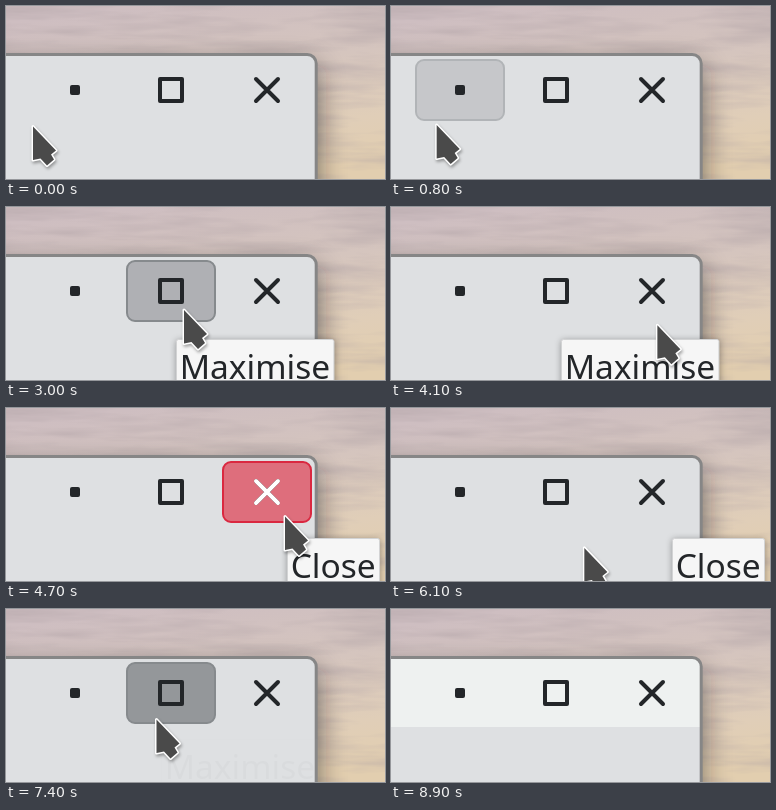
Recreate the animation shown at these times as an HTML page. Size 379 by 173 pixels, loop 9000 ms.

```html
<!DOCTYPE html>
<html lang="en">
<head>
<meta charset="utf-8">
<title>Window buttons</title>
<style>
  html, body { margin: 0; width: 100%; height: 100%; overflow: hidden; }
  svg { display: block; width: 379px; height: 173px; }
  text { font: 33.5px "Noto Sans", sans-serif; fill: #232629; }
  .icon { fill: none; stroke: #232629; stroke-width: 4; stroke-linejoin: round; stroke-linecap: round; }
  .light { stroke: #fff; }
  .hover { stroke: #868a8d; stroke-width: 2; }
  .hover.danger { stroke: #da2840; }
  .tip rect { fill: #f6f6f6; stroke: #d2d3d4; filter: drop-shadow(0 1px 3px #0005); }
  #pointer { filter: drop-shadow(1px 2px 1.5px #0005); }
</style>
</head>
<body>
<svg viewBox="0 0 379 173">
  <defs>
    <linearGradient id="sky" x1=".35" x2=".65" y2="1">
      <stop offset="0" stop-color="#cebec1"/>
      <stop offset=".4" stop-color="#d5c5be"/>
      <stop offset=".75" stop-color="#e0ceb8"/>
      <stop offset="1" stop-color="#e2ceaf"/>
    </linearGradient>
    <filter id="streaks" x="0" y="0" width="1" height="1">
      <feTurbulence type="fractalNoise" baseFrequency=".009 .07" numOctaves="4" seed="4"/>
      <feColorMatrix values="0 0 0 0 .42  0 0 0 0 .35  0 0 0 0 .37  1 0 0 0 -.38"/>
    </filter>
    <filter id="blur" filterUnits="userSpaceOnUse" x="-120" y="-40" width="600" height="360">
      <feGaussianBlur stdDeviation="14"/>
    </filter>
    <clipPath id="inside"><rect x="-20" y="48.5" width="330.2" height="200" rx="9"/></clipPath>
  </defs>

  <rect width="379" height="173" fill="url(#sky)"/>
  <rect width="379" height="173" filter="url(#streaks)"/>
  <rect id="shadow" x="-60" y="60" width="371" height="220" rx="9" fill="#1d1512" filter="url(#blur)"/>
  <rect x="-20" y="48.5" width="330.2" height="200" rx="9" fill="#dee0e2"/>
  <rect id="inactive" y="48" width="312" height="70" fill="#eef1f0" clip-path="url(#inside)"/>
  <rect x="-20" y="48.5" width="330.2" height="200" rx="9" fill="none" stroke="#868686" stroke-width="3"/>

  <g id="hovers"></g>
  <rect x="64" y="79" width="10" height="10" rx="2" fill="#232629"/>
  <rect class="icon" x="154" y="73" width="22" height="22"/>
  <path class="icon" d="M250 73l22 22m0-22l-22 22"/>
  <path id="lightCross" class="icon light" d="M250 73l22 22m0-22l-22 22"/>
  <g id="tips"></g>
  <path id="pointer" d="M0 0V33.5L7.5 32L14 39L21 33L18 28L23 24Z"
        fill="#4a4a4a" stroke="#fff" stroke-width="3" stroke-linejoin="round" paint-order="stroke"/>
</svg>
<script>
const LOOP = 9000, STEP = 100, FADE = 200, PRESS = 7000, DEACTIVATE = 8900;
const $ = id => document.getElementById(id);

// Each visit: pointer leaves at `go`, reaches (x, y) at `stop`;
// `hover` and `tip` are the times at which these are fully shown.
const visits = [
  { button: 0, label: "Minimise", go: 400, stop: 1000, x: 55, y: 108.5, hover: 900, tip: 1700, left: 57, top: 125 },
  { button: 1, label: "Maximise", go: 1800, stop: 2400, x: 178, y: 103, hover: 3000, tip: 3000, left: 170, top: 132 },
  { button: 2, label: "Close", go: 3400, stop: 4200, x: 279, y: 108.5, hover: 4500, tip: 4700, left: 281, top: 130 },
  { button: 1, label: "Maximise", go: 5700, stop: 6300, x: 150.5, y: 110.5, hover: 6600, tip: 6600, left: 155, top: 130 },
  { go: 7600, stop: 8100, x: -32, y: 120 }
];
const hovering = visits.slice(0, -1);

function add(parent, tag, attributes, text = "") {
  const node = document.createElementNS("http://www.w3.org/2000/svg", tag);
  for (const name in attributes) node.setAttribute(name, attributes[name]);
  node.textContent = text;
  return parent.appendChild(node);
}

for (const visit of hovering) {
  const danger = visit.label === "Close";
  visit.fill = danger ? "#de6e7c" : "#afb0b4";
  visit.hoverNode = add($("hovers"), "rect", {
    class: danger ? "hover danger" : "hover", x: 25 + 96 * visit.button, y: 54, width: 88, height: 60, rx: 8
  });
  visit.tipNode = add($("tips"), "g", { class: "tip", transform: `translate(${visit.left} ${visit.top})` });
  const box = add(visit.tipNode, "rect", { x: .5, y: .5, height: 60, rx: 2 });
  const text = add(visit.tipNode, "text", { x: 3.7, y: 40 }, visit.label);
  box.setAttribute("width", text.getComputedTextLength() + 7);
}

const progress = (t, a, b) => Math.min(1, Math.max(0, (t - a) / (b - a)));
const shown = (t, on, off, fadeOut = FADE) =>
  progress(t, on - FADE, on) * (1 - progress(t, off, off + fadeOut));

// Straight glide that sags downwards in proportion to its length
function pointerAt(t) {
  let x = 27, y = 120.5;
  for (const to of visits) {
    const p = progress(t, to.go, to.stop);
    const sag = .27 * Math.abs(to.x - x) * Math.sin(Math.PI * p);
    x += (to.x - x) * p;
    y += (to.y - y) * p + sag;
    if (p < 1) break;
  }
  return [x, y];
}

function draw(now) {
  const t = Math.floor(now % LOOP / STEP) * STEP;
  const pressed = t >= PRESS;
  hovering.forEach((visit, i) => {
    const next = visits[i + 1];
    const hover = shown(t, visit.hover, next.go + FADE);
    // A tip stays until the next one replaces it; pressing fades the last one slowly
    const tip = next.tip ? shown(t, visit.tip, next.tip - FADE) : shown(t, visit.tip, PRESS - STEP, 510);
    visit.hoverNode.setAttribute("opacity", hover);
    visit.hoverNode.setAttribute("fill", pressed ? "#94979a" : visit.fill);
    visit.tipNode.setAttribute("opacity", tip);
    if (visit.label === "Close") $("lightCross").setAttribute("opacity", hover);
  });
  $("inactive").setAttribute("opacity", +(t >= DEACTIVATE));
  $("shadow").setAttribute("opacity", t >= DEACTIVATE ? .5 : .57);
  $("pointer").setAttribute("transform", `translate(${pointerAt(t)})`);
}

const begin = performance.now();
function tick() {
  draw(performance.now() - begin);
  requestAnimationFrame(tick);
}
tick();
</script>
</body>
</html>
```
